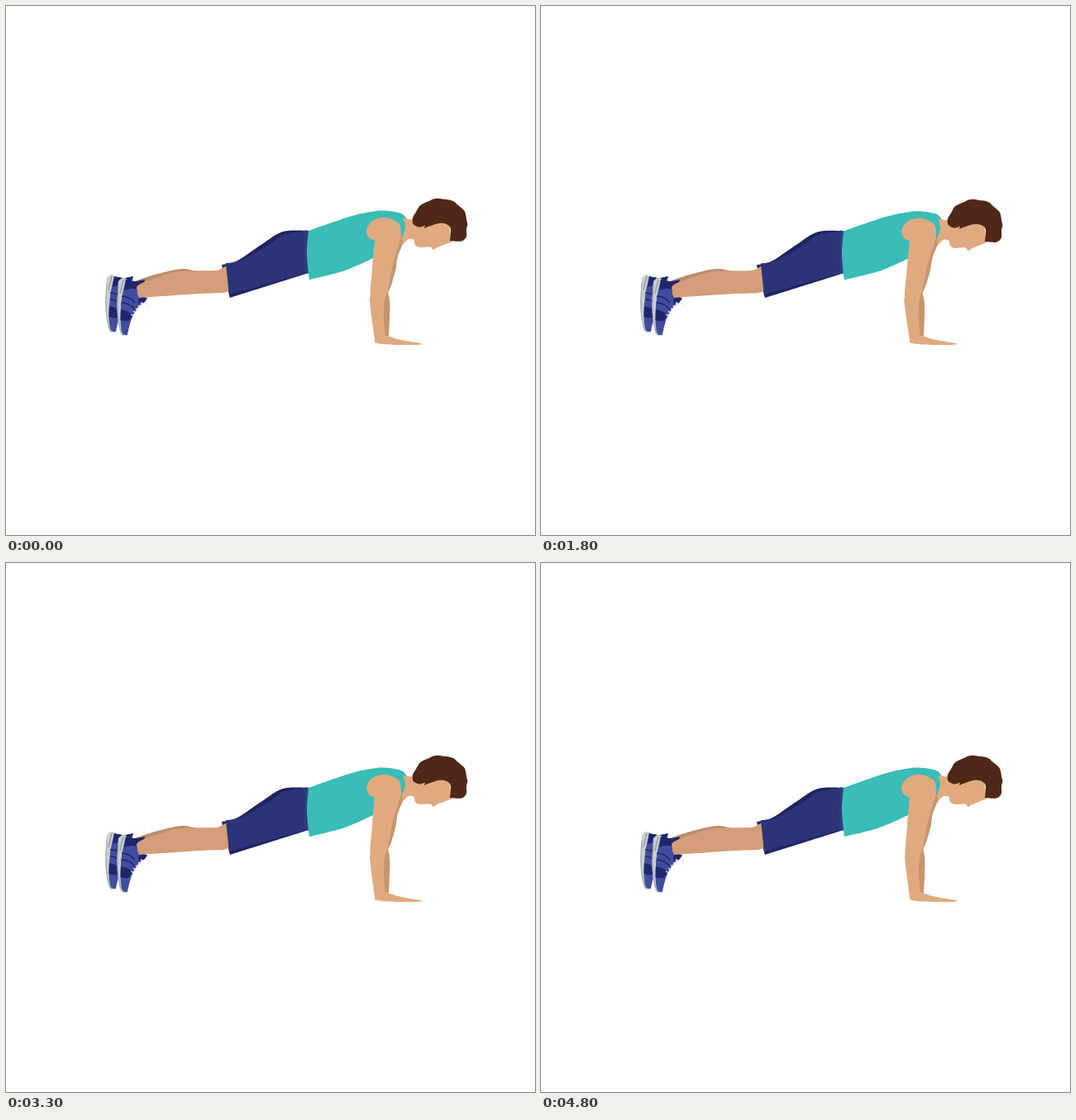
Write an HTML page with a canvas that moves like this. It is 640x640 px and loops after 5 s.

```html
<!DOCTYPE html>
<html lang="en">
<head>
<meta charset="utf-8">
<title>Push-ups</title>
<style>
html, body { margin: 0; width: 100%; height: 100%; overflow: hidden; background: #fff; }
canvas { display: block; width: 100%; height: 100%; }
</style>
</head>
<body>
<canvas id="stage" width="640" height="640"></canvas>
<script>
const ctx = document.getElementById('stage').getContext('2d');

const SKIN = '#e0aa80', SKIN_SHADE = '#c5956f';
const LEG = '#d39e79', LEG_SHADE = '#b98e6b';
const TEAL = '#3abcb7', NAVY = '#2b3478', DARK = '#1e2460', BELT = '#303d80';
const BLUE = '#424d9f', INK = '#20266b', SOLE = '#c8d0d0', GREY = '#9ba1a3';
const HAIR = '#502817', LACE = '#e6e9ef';

// Everything is drawn in the raised pose. Three handles per part say how far
// it is carried when lowered: [x, y, dx, dy], plus 1 if the handle bends.
const RIG = {
  shoes: [[135, 328, 0, 0], [172, 363, -1.5, 1.6], [125, 395, -2.9, -.4]],
  leg: [[160, 345, 0, 1], [268, 314, .5, 7], [270, 344, 0, 7.5]],
  shorts: [[266, 312, -4, 7], [271, 353, -2, 6], [366, 298, 1, 13]],
  shirt: [[366, 272, 4, 18, 1], [367, 331, -8, 17, 1], [485, 258, 4, 43]],
  neck: [[480, 257, 5, 41], [495, 259, 2, 45], [487, 282, -3, 43]],
  armpit: [[480, 287, -4, 42], [446, 283, -6, 30], [462, 347, -31, 25, 1]],
  upperArm: [[436, 272, 2, 34], [477, 266, 1.5, 37], [451, 352, -32, 22, 1]],
  forearm: [[441, 354, -34, 20, 1], [461, 347, -30, 24, 1], [455, 402, 0, 0]],
  head: [[516, 294, -4, 49], [545, 285, -2.8, 55.1], [523, 233, 8.2, 51.7]]
};

function frame([p, q, r]) {
  return new DOMMatrix([q[0] - p[0], q[1] - p[1], r[0] - p[0], r[1] - p[1], p[0], p[1]]);
}

function attach(part, body, bend) {
  const moved = RIG[part].map(([x, y, dx, dy, bends]) => {
    const k = bends ? bend : body;
    return [x + dx * k, y + dy * k];
  });
  ctx.setTransform(frame(moved).multiply(frame(RIG[part]).inverse()));
}

// "x,y" points; a trailing c makes a sharp corner.
function points(text) {
  return text.split(' ').map(s => {
    const [x, y] = s.split(',').map(parseFloat);
    return { x, y, corner: s.endsWith('c') };
  });
}

// Fills a smooth closed curve.
function blob(color, pts) {
  if (typeof pts === 'string') pts = points(pts);
  const at = i => pts[(i + pts.length) % pts.length];
  const slope = (i, axis) => at(i).corner ? 0 : (at(i + 1)[axis] - at(i - 1)[axis]) / 6;
  ctx.beginPath();
  ctx.moveTo(pts[0].x, pts[0].y);
  pts.forEach((a, i) => {
    const b = at(i + 1);
    ctx.bezierCurveTo(a.x + slope(i, 'x'), a.y + slope(i, 'y'),
      b.x - slope(i + 1, 'x'), b.y - slope(i + 1, 'y'), b.x, b.y);
  });
  ctx.fillStyle = color;
  ctx.fill();
}

function curve(color, width, x0, y0, cx, cy, x1, y1) {
  ctx.beginPath();
  ctx.moveTo(x0, y0);
  ctx.quadraticCurveTo(cx, cy, x1, y1);
  ctx.strokeStyle = color;
  ctx.lineWidth = width;
  ctx.stroke();
}

function shoe() {
  blob(SOLE, '136,333c 141,329 146,330c 139,365 144,398.5c 138,395 134.5,367 135,347');
  curve(GREY, 1, 136, 340, 132, 385, 142, 398.5);
  curve(GREY, 1.5, 142, 331, 140, 338, 138, 348);
  blob(BLUE, '145,331c 157,333 167,331c 161,341 160,350 168,353c 153,376 147,398c 141,396 138.5,380 140,355');
  blob(INK, '145,331c 157,333 168,331c 163,342 151,342 143,344c');
  blob(INK, '139,367c 146,369 153,373c 148,381 138.5,380c');
  for (const y of [351, 359]) curve(INK, 1.6, 140, y, 149, y, 156, y + 8);
}

function shoes() {
  ctx.save();
  ctx.translate(-14, -4);
  shoe();
  ctx.restore();
  shoe();
  blob(INK, '160,355c 165,351.5 171,353.5c 167,359 161,363c');
  for (let i = 0; i < 5; i++) {
    const x = 151 + i * 3, y = 373 - i * 3.6;
    curve(LACE, 1.3, x, y, x + 2, y + 1, x + 3.5, y + 2);
  }
  curve(LACE, 1.2, 162, 361, 180, 357, 169, 365.5);
}

// Crown of the hair: an ellipse with small waves, closed by the hairline.
function hair() {
  const crown = [];
  for (let a = Math.PI; a < 6.6; a += .19) {
    const r = 1 + .02 * Math.sin(a * 10);
    crown.push({ x: 525 + 33 * r * Math.cos(a), y: 262 + 29 * r * Math.sin(a) });
  }
  blob(HAIR, crown.concat(points(
    '557,279 551,284.5 537,284c 538,270 533,264 522,263.3 506,269c 507,265.5c 500,267.6 494,265')));
}

function draw(body, bend) {
  const on = (part, color, text) => {
    attach(part, body, bend);
    blob(color, text);
  };
  ctx.setTransform(1, 0, 0, 1, 0, 0);
  ctx.clearRect(0, 0, 640, 640);

  on('leg', LEG_SHADE, '156,333c 180,325 212,318 232,320.5 258,320c 165,339c');
  attach('shoes', body, bend);
  shoes();
  on('shorts', DARK, '261,313c 280,308 310,288 335,273 366,272c 366,323c 271,353c');
  on('leg', LEG, '161,337 190,326 210,321 235,320.5 255,320 267,314c 270,344c 262,347 235,348 161,353c 159,345');
  on('shorts', NAVY, '266,311c 285,307.5 318,289 335,277 365,272c 366,322c 270,349c');
  on('shorts', BELT, '362,271c 366,272c 364,300 367,324c 362,323c 361,300');
  on('shirt', TEAL, '366,272c 415,255 440,249.2 458,247.6 478,251 485,258c 482,275 478,283c 447,303.5c 410,320 367,331c 364,300');
  on('neck', SKIN, '480,257c 495,259c 502,275c 494,283c 487,282 479,290c 478,283c 483,268');
  on('armpit', SKIN_SHADE, '478,279c 480,287 474,303 472,317c 467,335 462,347c 455,345c 468,300');
  on('forearm', SKIN_SHADE, '462,346c 464.5,362 463,399c 456,399c 456,350c');
  on('forearm', SKIN, '441,351 441,366 446,403c 459,400c 457,376 458,357 460,347 450,342');
  on('upperArm', SKIN, '436,272 441,262 450,257 460,256 471,260 477,266 478,280c 468,313 461,346 451,360 441,354 443,318 446,283c 440,281');
  on('head', SKIN, '494,259c 535,260c 540,285c 522,292 517,295 513,291.5 501,292 495,289 494,282c');
  hair();

  ctx.setTransform(1, 0, 0, 1, 0, 0);
  blob(SKIN, '446,401c 446,407c 455,409 475,410 500,409.7 502.5,408.2c 475,403.3 462,399c');
}

// One push-up takes 16 steps: down until step 9, then back up,
// where the elbows and hem straighten ahead of the body.
function pushUp(step) {
  const swing = s => .5 - .5 * Math.cos(Math.PI * Math.max(s, 0));
  if (step <= 9) {
    const k = 1.03 * swing((step - 1) / 8) ** 1.2;
    return [k, k];
  }
  const rise = swing((16 - step) / 7);
  return [1.03 * rise ** .82, 1.03 * rise ** 1.5];
}

const start = performance.now();
function tick() {
  const step = Math.floor((performance.now() - start) % 5000 / 100);
  draw(...pushUp(Math.min(step, 48) % 16));
  requestAnimationFrame(tick);
}
tick();
</script>
</body>
</html>
```
